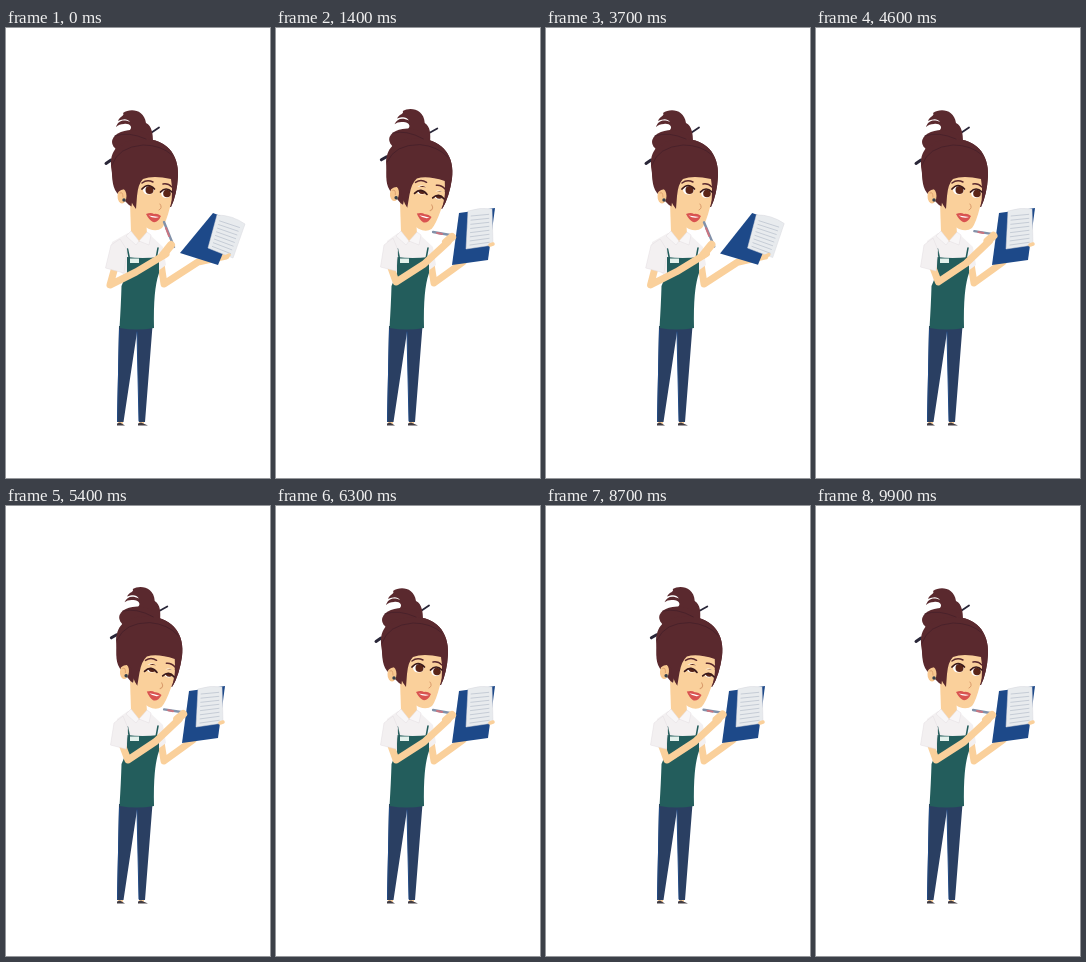
These frames come from a looping animation (264x450 px, 10000 ms). An HTML page:

```html
<!DOCTYPE html>
<html lang="en">
<head>
<meta charset="utf-8">
<style>
html, body { margin: 0; height: 100%; overflow: hidden; background: #fff; }
svg { display: block; width: 100vw; height: 100vh; }
.line { fill: none; stroke-linecap: round; stroke-linejoin: round; }
.skin { stroke: #fad09b; }
.hair { fill: #5a292e; }
</style>
</head>
<body>
<svg viewBox="0 0 264 450">
  <!-- legs -->
  <path d="M112 390h5v6h-5zM133 390h5v6h-5z" fill="#fad09b"/>
  <path d="M113 298H146.500L139 394H133L131 304L117.500 394H111Z" fill="#2a3f62"/>
  <path d="M113.500 302L111.500 393M131 304L133 393" class="line" stroke="#204a86" stroke-width="1"/>
  <path d="M111 397.500v-2l3-1 5 3zM132 397.500v-2l3-1 7 3z" fill="#403b42"/>

  <!-- torso -->
  <path id="farArm" class="line skin" stroke-width="7"/>
  <path id="shirt" fill="#f3f0f1"/>
  <path d="M124 174L125 204L133 214L141 206L140 190Z" fill="#fad09b"/>
  <path d="M125 203L120 208L130 217L133 213ZM141 204L133 213L143 217L145 207Z" fill="#f8f6f7" stroke="#e2dde0" stroke-width=".5"/>
  <path d="M121.500 221L123.500 231M152 220L150 231" class="line" stroke="#205b59" stroke-width="1.500"/>
  <path d="M121 229Q136 231 153 229L153 245Q147 262 148 300Q131 303 113.500 300Q115 276 115.500 258L121 245Z" fill="#235d5c"/>
  <path d="M124 230.500h9v4.500h-9z" fill="#e2f1ec"/>

  <g id="head">
    <path d="M100 135.500L105 132" class="line" stroke="#292638" stroke-width="3"/>
    <path d="M136 111L153 99.500" class="line" stroke="#292638" stroke-width="1.800"/>
    <path d="M117 85C124 80 138 81 140 95C146 98 147 106 147 114L108 114C109 107 117 105 123 103C128 99 123 95 118 96Q113 96 110 99C112 93 117 91 124 94C121 90 117 91 112 93C114 88 119 88 117 85Z" class="hair"/>
    <ellipse cx="126" cy="114" rx="20" ry="12" class="hair"/>
    <path d="M105 137C104 120 116 111 138 111C160 111 173 126 172 148Q171 166 165 179L130 181L123 177L111 165C105 157 107 148 105 137Z" class="hair"/>
    <ellipse cx="116" cy="168" rx="4.500" ry="7.500" fill="#f8c88f"/>
    <path d="M114 165q3-2 3 4" class="line" stroke="#d99b6b" stroke-width=".8"/>
    <path d="M129 147H168Q169 165 164 179Q160 195 156 200Q151 204 143 201Q132 196 125 183Z" fill="#fad09b"/>
    <path d="M105 137C106 120 119 112 138 111C160 111 173 126 172 148Q171 167 165 179Q167 163 165 151Q147 147 137 151Q132 156 131 168L130 181Q124 174 122 163Q118 159 112 164C106 158 107 148 105 137Z" class="hair"/>
    <path d="M106 137Q112 119 137 117Q155 117 166 127M109 108Q122 103 140 111" class="line" stroke="#46202a" stroke-width=".8"/>
    <circle cx="118" cy="172" r="1.700" fill="#34404c"/>
    <ellipse cx="142.500" cy="162" rx="5.500" ry="4.500" fill="#fff"/>
    <ellipse cx="160" cy="165.500" rx="4.800" ry="4.500" fill="#fff"/>
    <circle cx="143.500" cy="162" r="4" fill="#5a2518"/>
    <circle cx="161" cy="165.500" r="3.800" fill="#5a2518"/>
    <g id="lids">
      <path d="M136 154H149V162Q142 154 136 161ZM154 157H166V165Q160 158 154 164Z" fill="#fad09b"/>
      <path d="M136 161Q142 154 148.500 161M154.500 164Q160 158 166 164" class="line" stroke="#3a191b" stroke-width="1.700"/>
    </g>
    <path d="M136 155Q141 151 147 154M157 156Q162 155 166 159" class="line" stroke="#5a292e" stroke-width="1.500"/>
    <path d="M154 176Q157 180 153 182" class="line" stroke="#d99b6b" stroke-width="1"/>
    <path d="M140 186Q145 184 148 186Q151 185 155 188Q152 195 147 194Q143 192 140 186Z" fill="#d95350"/>
    <path d="M142.500 187.500Q148 188 153 189Q148 191 142.500 187.500Z" fill="#fff"/>
  </g>

  <path id="board" fill="#1d4989"/>
  <path id="paper" fill="#e8ebee" stroke="#d9d8df" stroke-width=".5"/>
  <path id="rules" class="line" stroke="#bdc5d0" stroke-width=".8"/>
  <path id="fingers" class="line skin" stroke-width="3.500"/>
  <g id="writing">
    <path id="pen" class="line" stroke="#8191a9" stroke-width="2.400"/>
    <path id="nearArm" class="line skin" stroke-width="7"/>
    <path id="hand" class="line skin" stroke-width="8"/>
    <path id="penTop" class="line" stroke="#cb7480" stroke-width="2"/>
  </g>
  <path id="sleeve" fill="#f3f0f1" stroke="#e2dde0" stroke-width=".5"/>
</svg>
<script>
const el = id => document.getElementById(id);

// Each part: path when resting, path when writing
const poses = {
  farArm: ["M155 236L158 256L192 234L220 228", "M155 236L158 255L176 242L187 234"],
  shirt: [
    "M122 205L106 214L102 236L117 246L118 262H149L152 243L160 237L157 219L143 206Z",
    "M122 205L111 213L108 236L117 244L118 262H149L152 243L160 237L157 219L143 206Z"
  ],
  sleeve: ["M114 211L105 217L99.500 240L118 245L121 222Z", "M117 210L108 217L104.500 239L120 243L122 222Z"],
  nearArm: ["M109 239L104 257L130 244L160 226", "M115 240L120 254L148 236L172 214"],
  hand: ["M157 227L165 217", "M170 214L176 209"],
  pen: ["M158 194L168 219", "M157 204L174 207"],
  penTop: ["M160 200L163 208", "M161 205L166 206"],
  board: ["M207 185L230 194L212 237L174 225Z", "M183 185L219 180L212 232L176 237Z"],
  paper: ["M211 187Q226 187 239 196L227 230L202 220Z", "M192 183Q204 179 216 181L217 217L190 221Z"],
  fingers: ["M219 229L223 227", "M214 217L217 216"]
};

function mix(from, to, k) {
  const ends = to.match(/[\d.]+/g);
  let i = 0;
  return from.replace(/[\d.]+/g, n => +n + (ends[i++] - n) * k);
}

function ease(t, start, end) {
  const k = Math.min(1, Math.max(0, (t - start) / (end - start)));
  return k * k * (3 - 2 * k);
}

function ruleLines(paper) {
  const [ax, ay, , , bx, by, cx, cy, dx, dy] = paper.match(/[\d.]+/g).map(Number);
  let d = "";
  for (let v = .14; v < .95; v += .11) {
    const lx = ax + (dx - ax) * v, ly = ay + (dy - ay) * v;
    const rx = bx + (cx - bx) * v, ry = by + (cy - by) * v;
    const at = k => `${lx + (rx - lx) * k} ${ly + (ry - ly) * k}`;
    d += `M${at(.14)}L${at(.86)}`;
  }
  return d;
}

function draw() {
  const t = Math.floor(performance.now() % 10000 / 100) * 100 % 3600;
  const raised = ease(t, 0, 900) - ease(t, 2700, 3300);
  const down = ease(t, 1000, 1400) - ease(t, 1800, 2200);
  const stroke = raised * (1.5 + 1.5 * Math.cos((t - 1000) / 700 * 2 * Math.PI));

  for (const id in poses) el(id).setAttribute("d", mix(...poses[id], raised));
  el("rules").setAttribute("d", ruleLines(el("paper").getAttribute("d")));
  el("writing").setAttribute("transform", `rotate(${-stroke * .4} 120 254) translate(${stroke * .8} 0)`);
  el("head").setAttribute("transform", `rotate(${down * 5} 145 195)`);
  el("lids").setAttribute("transform", `translate(0 ${down * 5})`);
  requestAnimationFrame(draw);
}
draw();
</script>
</body>
</html>
```
